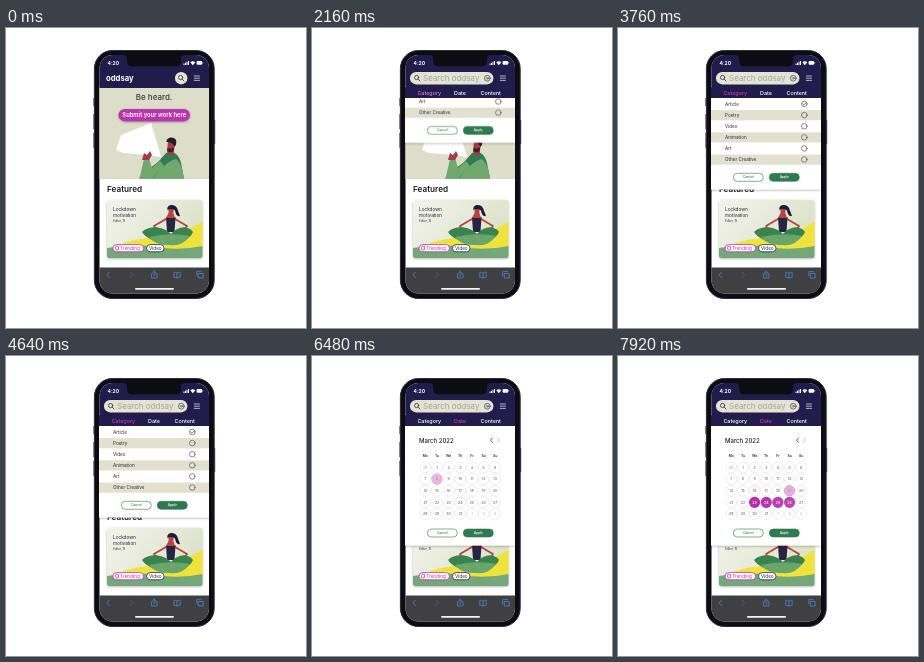
Recreate the animation shown at these times as an HTML page. Size 300 by 300 pixels, loop 8 s.

```html
<!DOCTYPE html>
<html lang="en">
<head>
<meta charset="utf-8">
<title>Phone search filter</title>
<style>
html, body { margin: 0; width: 100%; height: 100%; overflow: hidden; background: #fff; }
svg { display: block; width: 100vw; height: 100vh; }
text { font-family: Inter, Roboto, sans-serif; }
.mid { text-anchor: middle; }
.line { fill: none; stroke-linecap: round; stroke-linejoin: round; }

/* one shared 8 s clock */
.tabs, .bar, .lens, .hint, .arrow, .panel, .sheet, .list, .calendar,
.tab-cat, .tab-date, .tick0, .tick1 { animation: 8s linear infinite; }

/* search opens */
.tabs { animation-name: tabs; }
.bar { animation-name: bar; }
.lens { animation-name: lens; }
.hint { animation-name: hint; }
.arrow { animation-name: arrow; }
@keyframes tabs {
  0%, 8% { opacity: 0; animation-timing-function: ease-in-out }
  16%, 100% { opacity: 1 }
}
@keyframes bar {
  0%, 8% { x: 169px; width: 12.4px; animation-timing-function: ease-in-out }
  16%, 100% { x: 98px; width: 83.4px }
}
@keyframes lens {
  0%, 8% { transform: none; animation-timing-function: ease-in-out }
  16%, 100% { transform: translateX(-70px) }
}
@keyframes hint { 0%, 10% { opacity: 0 } 13% { opacity: .4 } 16%, 100% { opacity: 1 } }
@keyframes arrow { 0%, 13% { opacity: 0 } 16%, 100% { opacity: 1 } }

/* filter panel drops, then swaps to the calendar */
.panel { animation-name: panel; }
.sheet { animation-name: sheet; }
.list { animation-name: list; }
.calendar { animation-name: calendar; }
.tab-cat { animation-name: tab-cat; }
.tab-date { animation-name: tab-date; }
@keyframes panel {
  0%, 25% { transform: translateY(-110px); animation-timing-function: ease-out }
  30%, 100% { transform: none }
}
@keyframes sheet {
  0%, 73.5% { height: 91.5px; animation-timing-function: ease-in-out }
  77%, 100% { height: 119.5px }
}
@keyframes list { 0%, 73.5% { opacity: 1 } 75.5%, 100% { opacity: 0 } }
@keyframes calendar { 0%, 74.5% { opacity: 0 } 77%, 100% { opacity: 1 } }
@keyframes tab-cat { 0%, 25% { fill: #fff } 28%, 73.5% { fill: #c43ab8 } 76%, 100% { fill: #fff } }
@keyframes tab-date { 0%, 73.5% { fill: #fff } 76%, 100% { fill: #c43ab8 } }

/* ticks */
.tick0 { animation-name: tick0; }
.tick1 { animation-name: tick1; }
@keyframes tick0 { 0%, 39% { opacity: 0 } 44%, 100% { opacity: 1 } }
@keyframes tick1 { 0%, 57.5% { opacity: 0 } 64%, 100% { opacity: 1 } }
</style>
</head>
<body>
<svg viewBox="0 0 300 300">
  <defs>
    <clipPath id="screen"><rect x="93.5" y="27" width="109.500" height="238.500" rx="13"/></clipPath>
    <clipPath id="below"><rect x="93" y="60" width="110" height="180"/></clipPath>
    <clipPath id="field"><rect class="bar" x="169" y="44" width="12.400" height="12.400" rx="6.200"/></clipPath>
    <clipPath id="card"><rect x="101" y="172" width="95.500" height="58" rx="2.500"/></clipPath>
    <linearGradient id="cardFill" x2="1" y2=".5">
      <stop stop-color="#f3f3ea"/><stop offset=".5" stop-color="#e8ebdc"/><stop offset="1" stop-color="#dbe1c6"/>
    </linearGradient>
    <filter id="shade" x="-10%" y="-10%" width="120%" height="130%">
      <feDropShadow dx="0" dy=".8" stdDeviation=".8" flood-opacity=".3"/>
    </filter>
  </defs>

  <!-- phone -->
  <g fill="#4a4456">
    <rect x="87.400" y="70" width="1.200" height="8"/>
    <rect x="87.400" y="86" width="1.200" height="15"/>
    <rect x="87.400" y="105" width="1.200" height="15"/>
    <rect x="208" y="92" width="1.200" height="24"/>
  </g>
  <rect x="88.400" y="22.500" width="119.800" height="248" rx="18" fill="#0d0c13" stroke="#302b3c" stroke-width="1"/>

  <g clip-path="url(#screen)">
    <!-- page -->
    <rect x="93" y="27" width="110" height="239" fill="#fff"/>
    <rect x="93" y="58" width="110" height="93" fill="#dcdeca"/>
    <text class="mid" x="148" y="72.200" font-size="8" font-weight="500" fill="#38363c">Be heard.</text>
    <rect x="112.500" y="81" width="71.500" height="12.400" rx="6.200" fill="#b935ad" filter="url(#shade)"/>
    <text class="mid" x="148.300" y="89.300" font-size="5.850" font-weight="600" fill="#fff">Submit your work here</text>

    <!-- speaker with megaphone -->
    <path d="M133 150.500C137 143 147 139 153 133L160 125C168 122 173 127 175 135L178 150.500Z" fill="#2f7d50"/>
    <path d="M147 150.500C153 142 163 132 170 131C176 136 177 144 178 150.500Z" fill="#70a870"/>
    <path d="M161 123L162 113Q166 110 169 115L168 122L168 127L162 127Z" fill="#a53a4a"/>
    <path d="M160.500 114C160 109 168 108 170 112Q171 116 168.500 119Q167 114 160.500 114Z" fill="#221b26"/>
    <path d="M161.500 120Q165 122 168 119L167.500 123Q164 125.500 161.500 123Z" fill="#33212a"/>
    <path d="M110 122L115 107L145 95L155 129L142 127L117 125Z" fill="#fff"/>
    <path d="M133.500 150.500L138 131L143 130L146 140L154 133L158 138L146 150.500Z" fill="#70a870"/>
    <path d="M136 132L138 125L141 127L144 123L146 127L143 132Z" fill="#a53a4a"/>

    <text x="101" y="164" font-size="8.200" font-weight="600" fill="#1d1b20">Featured</text>

    <!-- card -->
    <rect x="101" y="172" width="95.500" height="58" rx="2.500" fill="url(#cardFill)" filter="url(#shade)"/>
    <g clip-path="url(#card)">
      <path d="M116 216C135 207 172 212 197 193V221C175 225 140 223 116 216Z" fill="#efe23c"/>
      <path d="M101 220Q128 215 150 219T197 218V231H101Z" fill="#74a779"/>
      <path d="M160 191L148 198L152 204M169 191L181 198L177 204" class="line" stroke="#b8433f" stroke-width="1.800"/>
      <path d="M160 189H169.500L168.500 204H161Z" fill="#292344"/>
      <path d="M163 184H167L169 190H160Z" fill="#b8433f"/>
      <ellipse cx="165" cy="182.500" rx="2.500" ry="3.500" fill="#b8433f"/>
      <path d="M161.500 182C160 176 169 175.500 171 180L174 188Q170 189 169 182.500Q165 180 161.500 182Z" fill="#211b38"/>
      <path d="M136 204C144 196 158 199 165 206C172 198 182 197 187 204C183 213 174 214 165 213C154 215 142 213 136 204Z" fill="#39834e"/>
      <path d="M143 209Q164 204 184 208Q176 219 164 217Q150 218 143 209Z" fill="#6aa66c"/>
    </g>
    <g fill="#29263a" font-size="4.700" font-weight="400">
      <text x="107" y="182.500">Lockdown</text>
      <text x="107" y="188.700">motivation</text>
      <text x="107" y="194.300" font-size="2.900">Editor, 15</text>
    </g>
    <g font-size="4.700" fill="#fff" stroke-width=".8">
      <rect x="107" y="216.600" width="30.500" height="7.200" rx="3.600" stroke="#b934ab"/>
      <rect x="140.500" y="216.600" width="17.500" height="7.200" rx="3.600" stroke="#2a2450"/>
      <rect x="109.700" y="218.200" width="2.800" height="3.800" rx=".7" stroke="#b934ab"/>
      <text x="114.200" y="221.900" fill="#b934ab">Trending</text>
      <text class="mid" x="149.300" y="221.900" fill="#2a2450">Video</text>
    </g>

    <!-- filter panel -->
    <g class="tabs"><rect x="93" y="59" width="110" height="11" fill="#221c4d"/></g>
    <g clip-path="url(#below)">
      <g class="panel">
        <rect class="sheet" x="93" y="70" width="110" height="91.500" fill="#fff" filter="url(#shade)"/>
        <g class="list" id="list"></g>
        <g class="calendar" id="calendar">
          <text x="107" y="86.600" font-size="6" font-weight="500" fill="#222">March 2022</text>
          <path class="line" d="M180.500 82L178.500 84.200L180.500 86.400" stroke="#333" stroke-width=".8"/>
          <path class="line" d="M185.500 82L187.500 84.200L185.500 86.400" stroke="#b5b5b5" stroke-width=".8"/>
        </g>
      </g>
    </g>

    <!-- header -->
    <rect x="93" y="27" width="110" height="33" fill="#221c4d"/>
    <g class="tabs">
      <rect x="93" y="59.500" width="110" height="10.500" fill="#221c4d"/>
      <g class="mid" font-size="5.400" font-weight="500" fill="#fff">
        <text class="tab-cat" x="117.300" y="67.400">Category</text>
        <text class="tab-date" x="148" y="67.400">Date</text>
        <text x="178.700" y="67.400">Content</text>
      </g>
    </g>
    <text x="100" y="52.700" font-size="7.700" font-weight="700" fill="#fff">oddsay</text>
    <path class="line" d="M188.300 48H193.500M188.300 50.200H193.500M188.300 52.400H193.500" stroke="#d5d2e0" stroke-width=".8"/>
    <rect class="bar" x="169" y="44" width="12.400" height="12.400" rx="6.200" fill="#e4e4d5"/>
    <g clip-path="url(#field)">
      <text class="hint" x="111" y="53" font-size="8" fill="#a5a49d">Search oddsay</text>
    </g>
    <g class="lens line" stroke="#45414f" stroke-width=".9">
      <circle cx="174.600" cy="49.500" r="2.100"/><path d="M176.200 51.200L178 53"/>
    </g>
    <g class="arrow line" stroke="#45414f" stroke-width=".7">
      <circle cx="175.300" cy="50.200" r="2.900"/><path d="M174 50.200H176.500M175.500 49.100L176.600 50.200L175.500 51.300"/>
    </g>

    <!-- status bar -->
    <path d="M117 27H179Q175 27 175 30V33Q175 38.500 169 38.500H127Q121 38.500 121 33V30Q121 27 117 27Z" fill="#0d0c13"/>
    <text x="101.500" y="36.800" font-size="5" font-weight="700" fill="#fff">4:20</text>
    <g fill="#fff">
      <path d="M177.500 35.500h1v1.500h-1zM179 34.700h1v2.300h-1zM180.500 33.800h1v3.200h-1zM182 33h1v4h-1z"/>
      <path d="M184.300 34.300Q186.800 32 189.300 34.300L186.800 37.200Z"/>
      <rect x="190.600" y="33" width="5.500" height="3.700" rx="1"/><rect x="196.500" y="34.200" width=".6" height="1.400"/>
    </g>

    <!-- browser bar -->
    <rect x="93" y="239.500" width="110" height="27" fill="#404043"/>
    <g class="line" stroke="#4a86d0" stroke-width=".8">
      <path d="M103.700 244L101 246.800L103.700 249.600"/>
      <path d="M124 244L126.700 246.800L124 249.600" stroke="#3d638e"/>
      <path d="M146.700 245.700H145.500V250H151V245.700H149.800M148.250 248V243.300M146.800 244.600L148.250 243.200L149.700 244.600"/>
      <path d="M171 245Q169.500 243.800 167.800 244.300V249.400Q169.500 249 171 250Q172.500 249 174.200 249.400V244.300Q172.500 243.800 171 245V250"/>
      <path d="M192.700 245.500H197.200V250H192.700ZM190.800 248V243.600H195.300"/>
    </g>
    <rect x="129" y="260" width="39" height="1.700" rx=".85" fill="#f4f4f6"/>
  </g>
</svg>
<script>
const NS = 'http://www.w3.org/2000/svg';
const MAGENTA = '#b52fa8', GREEN = '#2f7a50';
const list = document.getElementById('list');
const calendar = document.getElementById('calendar');

function add(parent, tag, attrs, content) {
  const el = document.createElementNS(NS, tag);
  for (const key in attrs) el.setAttribute(key, attrs[key]);
  if (content !== undefined) el.textContent = content;
  parent.appendChild(el);
  return el;
}

function label(parent, x, y, size, fill, content, weight = 400) {
  return add(parent, 'text', { class: 'mid', x, y, fill, 'font-size': size, 'font-weight': weight }, content);
}

function buttons(parent, cy) {
  const shape = { y: cy - 4, width: 30, height: 8, rx: 4, stroke: GREEN, 'stroke-width': .6 };
  add(parent, 'rect', { ...shape, x: 115.3, fill: '#fff' });
  add(parent, 'rect', { ...shape, x: 151.3, fill: GREEN });
  label(parent, 130.3, cy + 1.1, 3.2, GREEN, 'Cancel', 500);
  label(parent, 166.3, cy + 1.1, 3.2, '#fff', 'Apply', 600);
}

// category rows
['Article', 'Poetry', 'Video', 'Animation', 'Art', 'Other Creative'].forEach((name, i) => {
  const cy = 76 + i * 11.1;
  if (i % 2) add(list, 'rect', { x: 93, y: cy - 5, width: 110, height: 10.2, fill: '#e2e1d0' });
  add(list, 'text', { x: 107, y: cy + 1.6, 'font-size': 4.6, fill: '#2b2932' }, name);
  const ring = { class: 'line', stroke: '#4d4b55', 'stroke-width': .65 };
  add(list, 'circle', { ...ring, cx: 186.3, cy, r: 2.8 });
  if (i < 2) {
    add(list, 'path', { ...ring, class: 'line tick' + i, d: `M184.800 ${cy}l1.200 1.200l2.200 -2.600` });
  }
});
buttons(list, 149.3);

// day: [fade in, fade out] in ms
const picks = {
  8: [6400, 7330], 10: [6990, 7360], 11: [7010, 7380], 12: [7050, 7400],
  16: [7360, 7690], 17: [7380, 7670], 18: [7400, 7680], 19: [7420, 7788],
  23: [7600], 24: [7690], 25: [7700], 26: [7710]
};

function pulse(el, [on, off = 8000]) {
  const LOOP = 8000, FADE = 240;
  const keys = [[0, 0], [on, 0], [on + FADE, 1], [off, 1], [off + FADE, 0], [LOOP, 0]]
    .filter(([t], i) => i < 4 || (off < LOOP && t <= LOOP))
    .map(([t, opacity]) => ({ offset: t / LOOP, opacity }));
  el.animate(keys, { duration: LOOP, iterations: Infinity });
}

const column = i => 113.3 + i * 11.65;
['Mo', 'Tu', 'We', 'Th', 'Fr', 'Sa', 'Su'].forEach((name, i) =>
  label(calendar, column(i), 101.2, 3.4, '#333', name, 600));

for (let i = 0; i < 35; i++) {
  const cx = column(i % 7), cy = 111.4 + Math.floor(i / 7) * 11.65;
  const inMonth = i > 0 && i < 32;
  const day = i === 0 ? 28 : inMonth ? i : i - 31;
  add(calendar, 'circle', { cx, cy, r: 5.4, fill: '#fff', stroke: '#dedde0', 'stroke-width': .5 });
  label(calendar, cx, cy + 1.3, 3.6, inMonth ? '#55535c' : '#a9a7ae', day);
  if (inMonth && picks[day]) {
    const mark = add(calendar, 'g', { opacity: 0 });
    add(mark, 'circle', { cx, cy, r: 5.6, fill: MAGENTA });
    label(mark, cx, cy + 1.3, 3.6, '#fff', day, 500);
    pulse(mark, picks[day]);
  }
}
buttons(calendar, 177);
</script>
</body>
</html>
```
